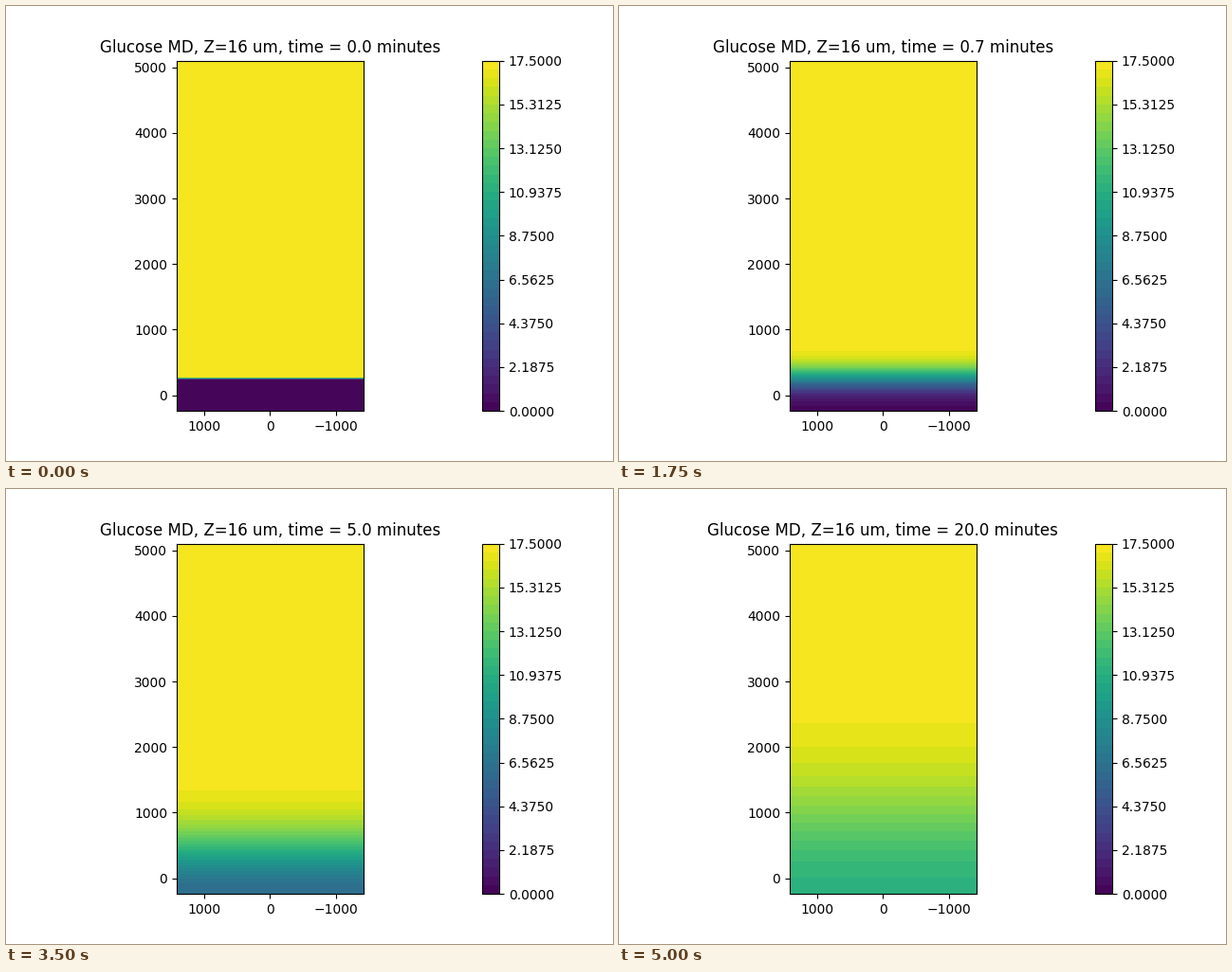
Animation of 640x480 px, one loop 5250 ms. Source, as a matplotlib script:

```python
import matplotlib.pyplot as plt
import numpy as np
from matplotlib.animation import FuncAnimation

plt.rcParams["font.family"] = "DejaVu Sans"

DX = 32.0        # voxel size, um
D = 30000.0      # diffusion coefficient, um^2 / min
DT = 0.01        # solver step, min
LAG = 0.03       # diffusion already done before the clock starts, min
C_MAX = 17.5

x = np.arange(-1424, 1425, DX)
y = np.arange(-240, 5105, DX)
levels = np.linspace(0, C_MAX, 41)
times = np.concatenate([np.arange(11) / 10, np.arange(2, 11), [20]])

# Laplacian with no-flux ends, diagonalised once
n = len(y)
lap = 2 * np.eye(n) - np.eye(n, k=1) - np.eye(n, k=-1)
lap[0, 0] = lap[-1, -1] = 1
lam, modes = np.linalg.eigh(lap)
step = np.where(y > 256, C_MAX, 0.0)


def profile(t):
    """Concentration along y after implicit Euler steps up to time t."""
    if t == 0:
        return step
    decay = (1 + DT * D / DX**2 * lam) ** -round((t + LAG) / DT)
    return np.clip(modes @ (decay * (modes.T @ step)), 0, C_MAX)


fig, ax = plt.subplots(figsize=(6.4, 4.8), dpi=100)


def fill(t):
    field = np.repeat(profile(t)[:, None], len(x), axis=1)
    return ax.contourf(x, y, field, levels=levels, cmap="viridis")


filled = fill(0)
fig.colorbar(filled, ax=ax, format="%.4f", panchor=False)
ax.set_aspect("equal", anchor="C")


def update(i):
    global filled
    filled.remove()
    filled = fill(times[i])
    ax.set_xlim(x[-1], x[0])
    ax.set_ylim(y[0], y[-1])
    ax.set_title(f"Glucose MD, Z=16 um, time = {times[i]:.1f} minutes")
    return []


anim = FuncAnimation(fig, update, frames=len(times), interval=250,
                     repeat=True, repeat_delay=0)
plt.show()
```
